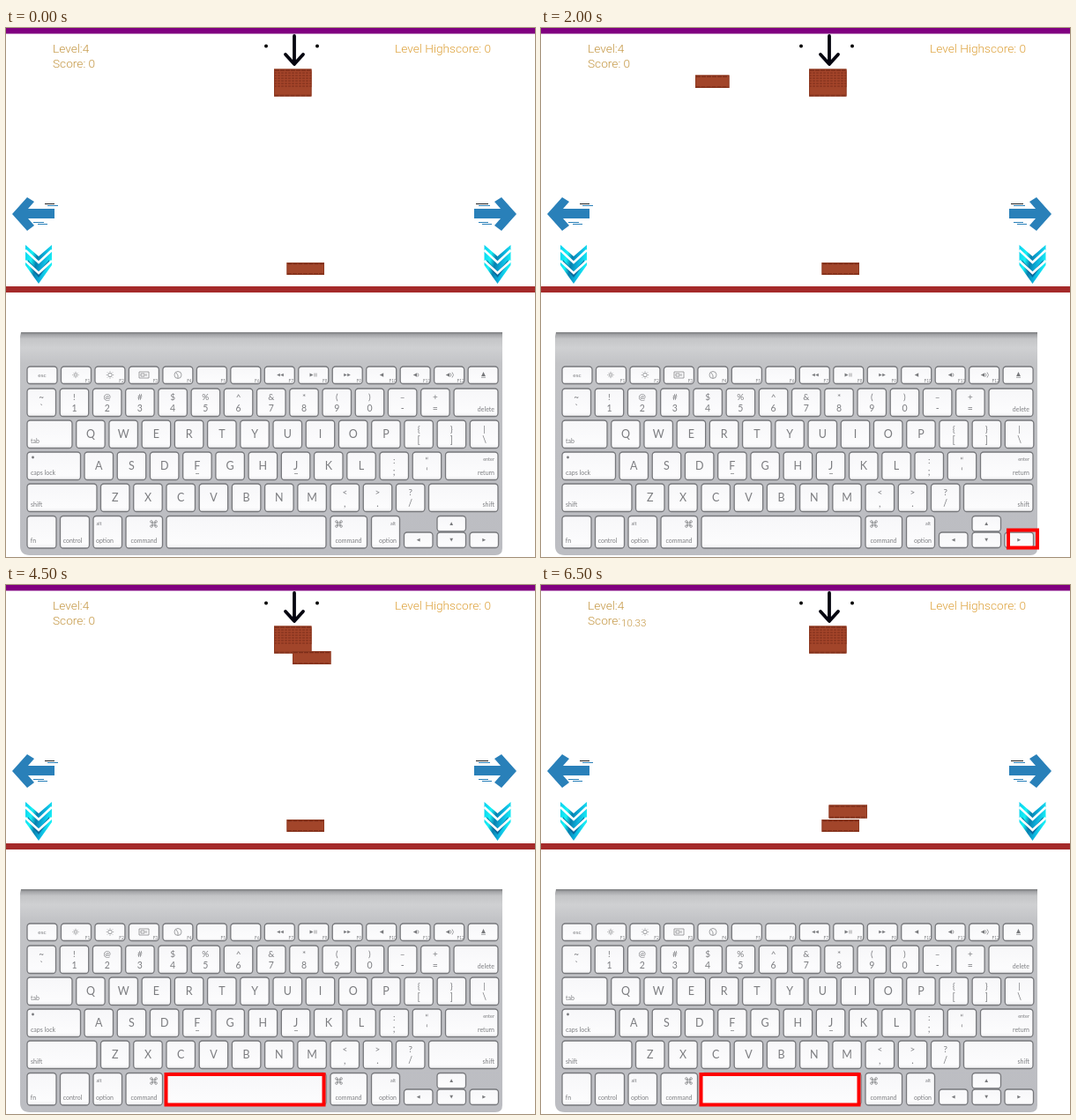
Write an HTML page that moves like this. It is 600 px wide and 600 px high and loops after 7000 ms.

```html
<!DOCTYPE html>
<html lang="en">
<head>
<meta charset="utf-8">
<title>Brick stacking controls</title>
<style>
html, body { margin: 0; width: 100%; height: 100%; overflow: hidden; background: #fff; }
svg { display: block; width: 100vw; height: 100vh; }
.hud { font: 300 13.7px Roboto, sans-serif; fill: #c39540; }
.key { fill: url(#cap); stroke: #77787c; stroke-width: 1.3; }
.label { font-family: Lato, sans-serif; fill: #7c7d80; }
.icon { fill: #77787b; }
.line { fill: none; stroke: #88898c; stroke-width: .8; }
</style>
</head>
<body>
<svg id="stage" viewBox="0 0 600 600">
  <defs>
    <linearGradient id="metal" x1="0" y1="345" x2="0" y2="598" gradientUnits="userSpaceOnUse">
      <stop offset="0" stop-color="#858689"/>
      <stop offset=".012" stop-color="#a5a6a9"/>
      <stop offset=".03" stop-color="#c4c5c7"/>
      <stop offset=".07" stop-color="#cfd0d2"/>
      <stop offset=".14" stop-color="#c2c3c6"/>
      <stop offset=".5" stop-color="#bebfc3"/>
      <stop offset="1" stop-color="#bcbdc2"/>
    </linearGradient>
    <linearGradient id="cap" x1="0" y1="0" x2="0" y2="1">
      <stop offset="0" stop-color="#f7f7f9"/>
      <stop offset=".85" stop-color="#fcfcfd"/>
      <stop offset="1" stop-color="#efeff1"/>
    </linearGradient>
    <linearGradient id="ice" x1="0" y1="0" x2="1" y2=".3">
      <stop offset="0" stop-color="#08cfee"/>
      <stop offset=".3" stop-color="#16f2f5"/>
      <stop offset=".5" stop-color="#067fae"/>
      <stop offset=".75" stop-color="#0cb4df"/>
      <stop offset="1" stop-color="#17edf5"/>
    </linearGradient>
    <pattern id="grain" width="4" height="3" patternUnits="userSpaceOnUse">
      <rect width="4" height="3" fill="#a5452a"/>
      <path d="M0 1.5H3" stroke="#7b2d19" stroke-width="1"/>
    </pattern>
    <g id="arrow">
      <path d="M7 211L24 192L32 197L25 205H55V216H25L32 224L24 230Z" fill="#2980b9"/>
    </g>
    <g id="chevrons">
      <path d="M22 246L37 259L52 246V269L37 290L22 269Z" fill="url(#ice)"/>
      <path d="M25 263L37 277L49 263V267L37 283L25 267Z" fill="#07568c" opacity=".75"/>
      <path d="M22 252L37 266L52 252M22 264L37 278L52 264" fill="none" stroke="#fff" stroke-width="2.6"/>
    </g>
  </defs>

  <rect width="600" height="600" fill="#fff"/>
  <rect width="600" height="6.5" fill="#800080"/>
  <rect y="293" width="600" height="7" fill="#a52a2a"/>
  <g class="hud">
    <text x="53" y="27.5">Level:4</text>
    <text id="score" x="53" y="45">Score: 0</text>
    <text id="points" x="91" y="47" font-size="11.5">10.33</text>
    <text x="441" y="27.5" fill="#dda038" style="fill:#dda038">Level Highscore: 0</text>
  </g>
  <path d="M327 9V40M317 30L327 41L337 30" fill="none" stroke="#050510" stroke-width="3.8" stroke-linecap="round" stroke-linejoin="round"/>
  <circle cx="295" cy="20.5" r="2"/>
  <circle cx="353" cy="20.5" r="2"/>

  <use href="#arrow"/>
  <use href="#arrow" transform="matrix(-1 0 0 1 586 0)"/>
  <path d="M44 199.5H55M533 199.5H547" stroke="#222" stroke-width="1"/>
  <path d="M47 201.5H59M31 220.5H43M36 222.5H47M536 201.5H549M536 220.5H547M540 222.5H551" stroke="#2980b9" stroke-width="1"/>
  <use href="#chevrons"/>
  <use href="#chevrons" x="520.5"/>

  <g id="bricks"></g>
  <path d="M17 345H563V590Q563 598 555 598H27Q16 598 16 587V350Z" fill="url(#metal)"/>
  <path d="M17 346H563" stroke="#87888b" stroke-width="1.5"/>
  <g id="keys"></g>
  <rect id="press" fill="none" stroke="#f00" stroke-width="4"/>
</svg>
<script>
const $ = id => document.getElementById(id);

function add(parent, tag, attrs, text = '') {
  const el = document.createElementNS('http://www.w3.org/2000/svg', tag);
  for (const name in attrs) el.setAttribute(name, attrs[name]);
  el.textContent = text;
  parent.append(el);
  return el;
}

// Bricks
function brick(x, y, w, h, lined) {
  const g = add($('bricks'), 'g', { transform: `translate(${x} ${y})` });
  add(g, 'rect', { width: w, height: h, fill: '#a2452a' });
  if (lined) add(g, 'rect', { y: 2, width: w, height: h * .6, fill: 'url(#grain)' });
  add(g, 'path', {
    d: `M.5 ${h - 1}H${w - 1}M1 1.5H${w - 1}`, stroke: '#7c2d19',
    'stroke-width': 1.3, 'stroke-dasharray': '5 1'
  });
  add(g, 'rect', { x: .4, y: .4, width: w - .8, height: h - .8, fill: 'none', stroke: '#8a3820', 'stroke-width': .8 });
  return g;
}
brick(304, 46.5, 42.5, 31, true);
brick(318.5, 266, 42.5, 14);
const halo = add($('bricks'), 'rect', { x: 323.5, y: 52, width: 46, height: 20, fill: '#fff' });
const narrow = brick(0, 0, 38.5, 14.5);
const wide = brick(0, 0, 43.5, 15);

// Keyboard
const keys = $('keys');

function key(x, y, w, h) {
  add(keys, 'rect', { class: 'key', x, y, width: w, height: h, rx: 3.5 });
}
function label(text, x, y, size, anchor = 'middle') {
  add(keys, 'text', { class: 'label', x, y, 'font-size': size, 'text-anchor': anchor }, text);
}
function triangle(x, y, dx, dy, r = 2.2) {
  const d = dx
    ? `M${x + dx * r} ${y}L${x - dx * r} ${y - r}V${y + r}Z`
    : `M${x} ${y + dy * r}L${x - r} ${y - dy * r}H${x + r}Z`;
  add(keys, 'path', { class: 'icon', d });
}
function line(d) { add(keys, 'path', { class: 'line', d }); }
function ring(x, y, r) { add(keys, 'circle', { class: 'line', cx: x, cy: y, r }); }

const PITCH = 37.22, CAP = 32.5, ROW_H = 31.5;

for (let i = 0; i < 14; i++) {
  const x = 24 + i * 38.47;
  key(x, 384, 34, 19.5);
  if (i > 0 && i < 13) label('F' + i, x + 30, 401.5, 4.8);
}
label('esc', 41, 395.5, 6.5);
for (const [x, r] of [[79, 1.6], [118, 2.2]]) {
  ring(x, 393.5, r);
  for (let a = 0; a < 8; a++) {
    const c = Math.cos(a * Math.PI / 4), s = Math.sin(a * Math.PI / 4);
    line(`M${x + c * (r + 1)} ${393.5 + s * (r + 1)}l${c} ${s}`);
  }
}
line('M151 390H162V397H151ZM153 392H157V395H153ZM159 392V395');
ring(195, 393.5, 4);
line('M195 394L193 391M195 394V397');
for (const x of [309, 313]) triangle(x, 393.5, -1, 0, 1.8);
triangle(346.5, 393.5, 1, 0, 2);
line('M350 391.5V395.5M352 391.5V395.5');
for (const x of [385, 389]) triangle(x, 393.5, 1, 0, 1.8);
triangle(426, 393.5, -1, 0);
triangle(464, 393.5, -1, 0);
line('M467 391.5Q469 393.5 467 395.5');
triangle(501, 393.5, -1, 0);
line('M504 391.5Q506 393.5 504 395.5M506 390.5Q509 393.5 506 396.5');
triangle(541.5, 392.5, 0, -1, 2.4);
line('M539 396.3H544');

// Double-legend caps are written as two characters, upper one first.
function row(y, x, caps) {
  caps.forEach((cap, i) => {
    const left = x + i * PITCH, mid = left + CAP / 2;
    key(left, y, CAP, ROW_H);
    if (cap.length > 1) {
      label(cap[0], mid, y + 12.5, 10);
      label(cap[1], mid, y + 26, 10.5);
    } else label(cap, mid, y + 20, 12.5);
  });
}
row(409, 24, ['~`', '!1', '@2', '#3', '$4', '%5', '^6', '&7', '*8', '(9', ')0', '–-', '+=']);
row(445, 79.7, [...'QWERTYUIOP', '{[', '}]', '|\\']);
row(481, 89, [...'ASDFGHJKL', ':;', '“‘']);
row(517, 107.5, [...'ZXCVBNM', '<,', '>.', '?/']);

const wideKeys = [
  [508, 409, 50, 'delete', 1], [24, 445, 51, 'tab'], [24, 481, 60.5, 'caps lock'],
  [498.5, 481, 59.5, 'return', 1], [24, 517, 79, 'shift'], [479.5, 517, 78.5, 'shift', 1]
];
for (const [x, y, w, text, right] of wideKeys) {
  key(x, y, w, ROW_H);
  label(text, right ? x + w - 4 : x + 4, y + 25.5, 7, right ? 'end' : 'start');
}
label('enter', 554, 491, 5.5, 'end');
add(keys, 'circle', { class: 'icon', cx: 30.5, cy: 487, r: 1.4 });
line('M215 505.5H219M327 505.5H331');

const bottomKeys = [
  [24, 33, 'fn', 31], [61.5, 33, 'control', 75.5], [99, 32.5, 'option', 112],
  [136, 41.5, 'command', 156.5], [182, 181], [368, 41.5, 'command', 388.5], [414.5, 32, 'option', 433]
];
for (const [x, w, text, mid] of bottomKeys) {
  key(x, 553.5, w, 36.5);
  if (text) label(text, mid, 584, 7);
}
label('alt', 105.5, 564, 5.5);
label('alt', 439, 564, 5.5);

function command(x, y) {
  for (const sx of [-1, 1]) for (const sy of [-1, 1]) ring(x + sx * 2.6, y + sy * 2.6, 1.3);
  line(`M${x - 1.3} ${y - 2.6}V${y + 2.6}M${x + 1.3} ${y - 2.6}V${y + 2.6}M${x - 2.6} ${y - 1.3}H${x + 2.6}M${x - 2.6} ${y + 1.3}H${x + 2.6}`);
}
command(167.5, 562.5);
command(377.5, 562.5);

const arrowKeys = [[451.5, 572, -1, 0], [489, 553.5, 0, -1], [489, 572, 0, 1], [526, 572, 1, 0]];
for (const [x, y, dx, dy] of arrowKeys) {
  key(x, y, CAP, 17.5);
  triangle(x + 16.2, y + 8.7, dx, dy, 1.9);
}

// Playback: [brick x, brick y, pressed key]
const STEP = 500;
const PRESS = {
  left: [450, 569.5, 34, 20],
  right: [530, 569.5, 33, 20],
  space: [181.5, 555, 179, 34.5]
};
const steps = [
  [],
  [248, 53.5, 'left'], [205.5, 53.5, 'left'], [163, 53.5, 'left'],
  [175, 53.5, 'right'], [211, 53.5, 'right'], [247.5, 53.5, 'right'], [286, 53.5, 'right'],
  [325.5, 54.5, 'right'],
  [325, 75, 'space'], [324.5, 96, 'space'], [325, 135, 'space'], [325, 198, 'space'],
  [326.5, 249.5, 'space']
];

const show = (el, on) => el.setAttribute('visibility', on ? 'visible' : 'hidden');

function render(index) {
  const [x, y, pressed] = steps[index];
  const landed = index === steps.length - 1;
  show(halo, index === 8);
  show(narrow, x < 300);
  show(wide, x >= 300);
  if (x) (x < 300 ? narrow : wide).setAttribute('transform', `translate(${x} ${y})`);
  show($('press'), pressed);
  if (pressed) ['x', 'y', 'width', 'height'].forEach((name, i) => $('press').setAttribute(name, PRESS[pressed][i]));
  $('score').textContent = landed ? 'Score:' : 'Score: 0';
  show($('points'), landed);
}

const start = performance.now();
let current = -1;
function tick() {
  const index = Math.floor((performance.now() - start) / STEP) % steps.length;
  if (index !== current) render(current = index);
  requestAnimationFrame(tick);
}
tick();
</script>
</body>
</html>
```
